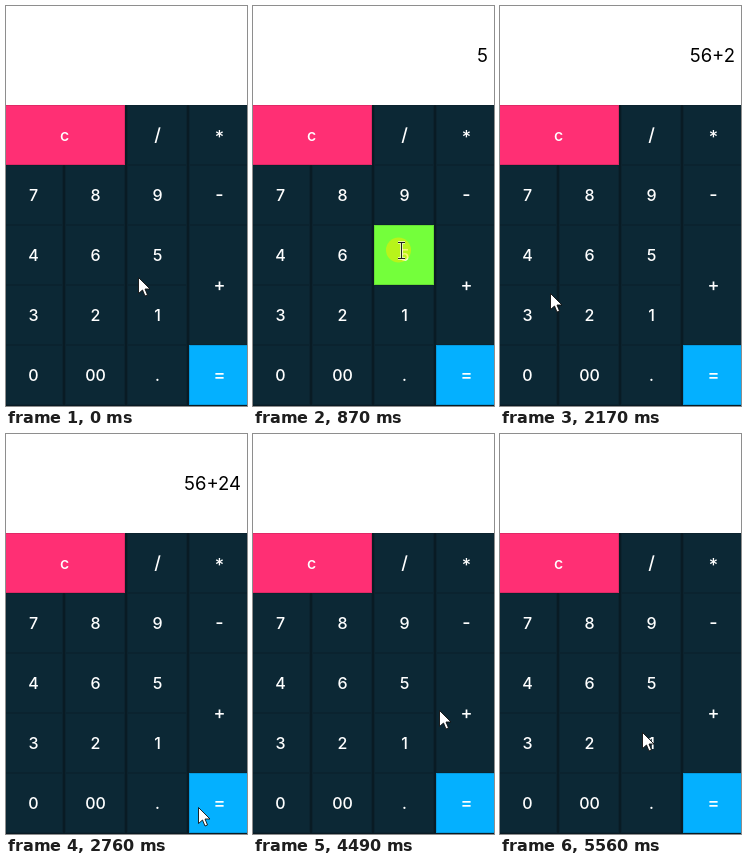
Animation, 241 px wide and 400 px high, one loop 6.68 s. Source, as an HTML page with a canvas:

```html
<!DOCTYPE html>
<html lang="en">
<head>
<meta charset="utf-8">
<title>Calculator</title>
<style>
  html, body { margin: 0; width: 100%; height: 100%; overflow: hidden; background: #fff; }
  canvas { display: block; }
</style>
</head>
<body>
<canvas id="stage" width="241" height="400"></canvas>
<script>
const ctx = document.getElementById('stage').getContext('2d');
const LOOP = 6680, REST = 150, HOLD = 115;
const COL = 62, ROW = 60, TOP = 99;
const FONT = 'Inter, "Open Sans", sans-serif';
const NAVY = '#0c2835', GREEN = '#74ff3b';
const ACCENT = { c: '#ff2f74', '=': '#04b0ff' };

// A label repeated in neighbouring cells makes one larger key.
const keys = new Map();
['c c / *', '7 8 9 -', '4 6 5 +', '3 2 1 +', '0 00 . ='].forEach((line, row) =>
  line.split(' ').forEach((label, col) => {
    const x = col * COL - 3, y = TOP + row * ROW;
    const key = keys.get(label) || { label, x, y, fill: ACCENT[label] || NAVY };
    key.w = x + ROW - key.x;
    key.h = y + ROW - key.y;
    keys.set(label, key);
  }));

// The pointer rests at each stop until the given time; a key there is clicked.
const stop = (until, x, y, key) => ({ until, x, y, key });
const stops = [
  stop(80, 133, 271),
  stop(480, 96, 247, '6'),
  stop(960, 148, 244, '5'),
  stop(1460, 209, 291, '+'),
  stop(1840, 96, 338),
  stop(1990, 95, 330, '2'),
  stop(2480, 15, 251, '4'),
  stop(2800, 193, 373),
  stop(3090, 206, 369, '='),
  stop(3750, 72, 168),
  stop(4080, 69, 145, 'c'),
  stop(4260, 69, 145),
  stop(4560, 187, 276),
  stop(4950, 184, 240),
  stop(LOOP, 143, 298)
];
stops.forEach((s, i) => {
  s.from = i ? Math.max(s.until - REST, stops[i - 1].until) : 0;
});
stops[stops.length - 1].from = 5560;

// The middle keys 5 and 6 are wired the wrong way round.
function press(text, key) {
  if (key === 'c') return '';
  if (key === '=') return String(text.split('+').reduce((sum, n) => sum + Number(n), 0));
  return text + ({ 5: '6', 6: '5' }[key] || key);
}

function pointerAt(t) {
  const i = stops.findIndex(s => t < s.until), b = stops[i];
  if (t >= b.from) return [b.x, b.y];
  const a = stops[i - 1];
  const k = (t - a.until) / (b.from - a.until), e = k * k * (3 - 2 * k);
  return [Math.round(a.x + (b.x - a.x) * e), Math.round(a.y + (b.y - a.y) * e)];
}

function rect(fill, x, y, w, h) {
  ctx.fillStyle = fill;
  ctx.fillRect(x, y, w, h);
}

function drawKey({ label, fill, x, y, w, h }, pressed) {
  rect(pressed && fill === NAVY ? GREEN : fill, x, y, w, h);
  ctx.strokeStyle = 'rgba(0,0,0,.12)';
  ctx.lineWidth = 1;
  ctx.strokeRect(x + 0.5, y + 0.5, w - 1, h - 1);
  ctx.font = `500 ${'/*-+='.includes(label) ? 18 : 16}px ${FONT}`;
  ctx.fillStyle = '#fff';
  ctx.fillText(label, x + w / 2 + 0.5, y + h / 2 + (label === '*' ? 9 : 6));
}

function drawArrow(x, y) {
  const outline = new Path2D('M0 0V16L4 12.5L6.5 18.5L9 17.5L6.5 11.5H11.5Z');
  ctx.save();
  ctx.translate(x - 0.5, y + 0.5);
  ctx.fillStyle = '#fff';
  ctx.fill(outline);
  ctx.strokeStyle = '#111';
  ctx.lineWidth = 0.9;
  ctx.stroke(outline);
  ctx.restore();
}

function drawBeam(x, y) {
  const outline = new Path2D('M-3 -8H4M-3 8H4M.5 -8V8');
  ctx.save();
  ctx.translate(x, y + 0.5);
  for (const [color, width] of [['rgba(255,255,255,.6)', 3], ['#222', 1]]) {
    ctx.strokeStyle = color;
    ctx.lineWidth = width;
    ctx.stroke(outline);
  }
  ctx.restore();
}

function overLabel(x, y) {
  return [...keys.values()].some(k =>
    Math.abs(x - k.x - k.w / 2) <= 5 * k.label.length &&
    Math.abs(y - k.y - k.h / 2) <= 12);
}

function draw(t) {
  const clicks = stops.filter(s => s.key);
  const active = clicks.find(s => t >= s.until - HOLD && t < s.until);
  const text = clicks.filter(s => t >= s.until).reduce((shown, s) => press(shown, s.key), '');
  const [x, y] = pointerAt(t);

  rect('#fff', 0, 0, 241, TOP);
  rect('#091b24', 0, TOP, 241, 301);

  ctx.font = '400 18.5px ' + FONT;
  ctx.textAlign = 'right';
  ctx.fillStyle = '#000';
  ctx.fillText(text, 235, 56);

  ctx.textAlign = 'center';
  keys.forEach(k => drawKey(k, active && active.key === k.label));

  if (active) {
    ctx.fillStyle = 'rgba(240,235,0,.55)';
    ctx.beginPath();
    ctx.arc(x - 2.5, y, 12.5, 0, Math.PI * 2);
    ctx.fill();
  }
  (overLabel(x, y) ? drawBeam : drawArrow)(x, y);
}

const start = performance.now();
function tick() {
  draw((performance.now() - start) % LOOP);
  requestAnimationFrame(tick);
}
tick();
</script>
</body>
</html>
```
